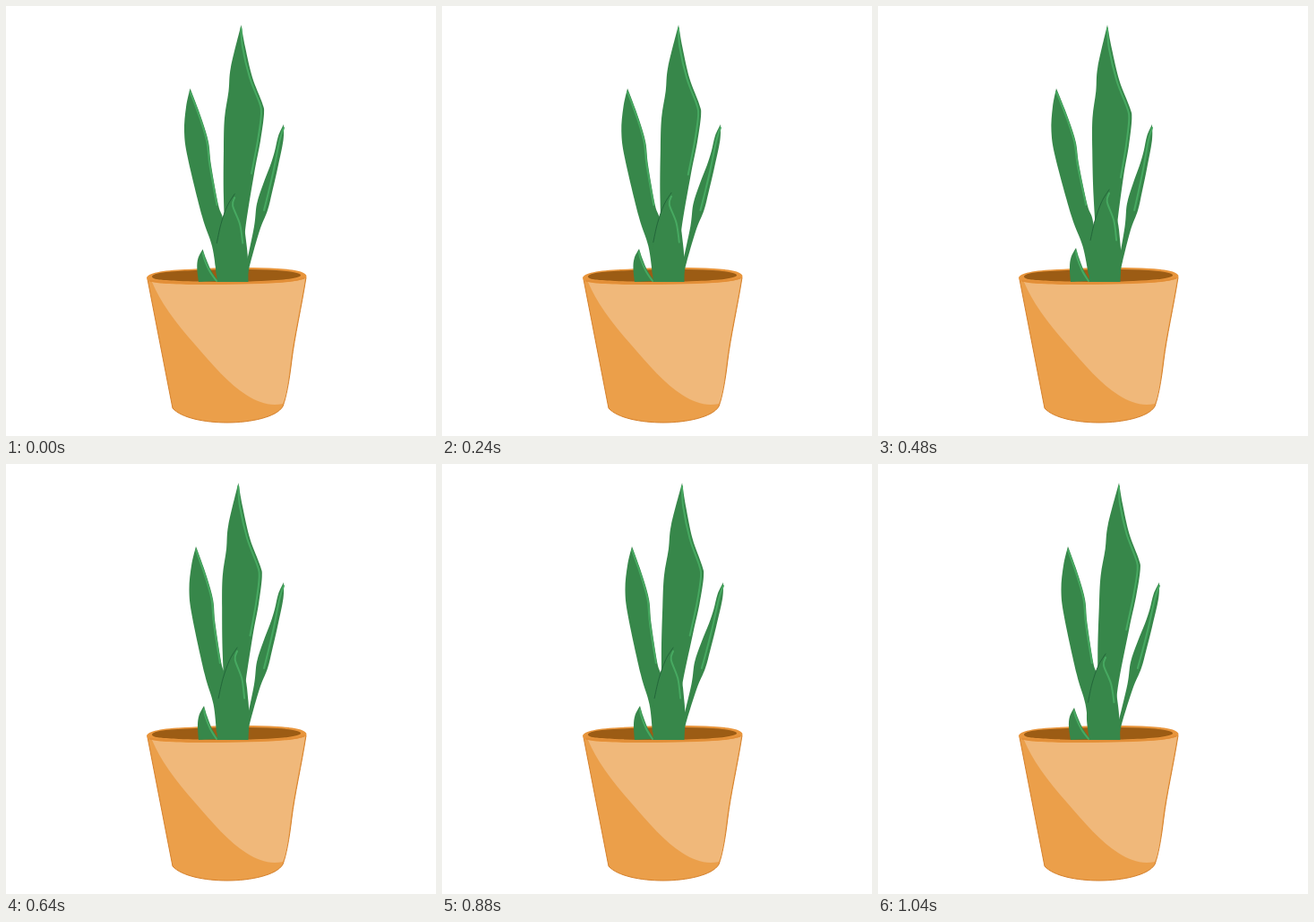
Write an HTML page that moves like this. It is 480 px wide and 480 px high and loops after 1.12 s.

```html
<!DOCTYPE html>
<html lang="en">
<head>
<meta charset="utf-8">
<title>Swaying plant</title>
<style>
  html, body { margin: 0; width: 100%; height: 100%; overflow: hidden; background: #fff; }
  svg { display: block; width: 100%; height: 100%; }
  .leaf { fill: #37874a; }
  .shine { fill: none; stroke: #47a961; stroke-width: 2; stroke-linecap: round; stroke-linejoin: round; }
  .seam { fill: none; stroke: #23663a; stroke-width: 1; stroke-linecap: round; }
</style>
</head>
<body>
<svg viewBox="0 0 480 480">
  <path fill="#eb9f4a" stroke="#d5812d" d="M158 305 L186 449 C196 460 222 465 247 465 C273 465 302 459 309 447 C313 436 316 420 319 395 C322 370 330 335 335 303 Z"/>
  <path fill="#f0b87a" d="M163 308 C172 330 188 352 211 378 C230 400 250 423 268 434 C282 443 295 447 309 444 C313 436 315 420 318 395 C321 370 329 335 334 304 Z"/>
  <path fill="#e8953c" d="M157 304 C157 298 175 295 200 294 C230 292 275 291 303 293 C323 294 336 297 335.500 302 C335 307 310 309 285 310 C255 311 225 311 203 311 C180 310 158 310 157 304 Z"/>
  <path fill="#9c5c14" d="M163 302 C164 298 182 296 203 295.500 C235 293.500 275 293.500 302 295 C318 296 329 298 329 300.500 C329 304 309 306 285 307 C255 308.500 215 308 193 307 C177 306 163 306 163 302 Z"/>
  <g id="plant"></g>
  <path fill="none" stroke="#e28e37" stroke-width="2" d="M160 306.500 C175 309 190 308 203 309.500 C230 309.500 265 309.500 285 308.500 C307 308 325 306 333 303.500"/>
</svg>
<script>
const LOOP = 1120, STEP = 80;
const FALL = 160, TURN = 480;

// Edges run from the tip down. A leaf leans by swing and is upright again at
// time back; move is the tip's shift when lifted; drop slides the right edge.
const leaves = [
  {
    tip: [262.5, 21], root: 255, power: 0.6, swing: 6.5, back: 960, drop: 8, inset: 3, lit: 7,
    left: [[251, 68], [248.5, 95], [244, 125], [243, 160], [243, 215], [246, 295]],
    right: [[267, 45], [275, 78], [286, 106], [288, 118], [284, 148], [277, 185], [267, 250], [264, 295]]
  },
  {
    tip: [205.5, 92], root: 285, power: 0.6, swing: 6.5, back: 640, inset: 1.5, lit: 6,
    left: [[201, 113], [199, 140], [203, 170], [219, 235], [230, 268], [235, 300]],
    right: [[211, 106], [219, 128], [226, 152], [229, 178], [237, 222], [243, 242], [246, 295]]
  },
  {
    tip: [310, 132], root: 290, power: 0.8, swing: 4, back: 800, inset: 4, lit: 5,
    left: [[304, 145], [300, 162], [295, 178], [287, 199], [280, 221], [277, 246], [268, 290]],
    right: [[309.5, 150], [303, 182], [297, 208], [292, 228], [283, 251], [273, 286], [270, 300]]
  },
  {
    tip: [254, 212], root: 307, power: 0.5, move: [4, -7], inset: 4, lit: 4, seam: true,
    left: [[246, 225], [239, 245], [234.5, 266], [233, 285], [236, 308]],
    right: [[256, 225], [264, 245], [267.5, 266], [269.5, 285], [270.5, 308]]
  },
  {
    tip: [219, 272], root: 307, power: 0.8, move: [2, -2], inset: 2, lit: 4,
    left: [[214, 282], [213, 293], [215, 308]],
    right: [[223, 283], [229, 296], [237, 307]]
  }
];

const plant = document.getElementById('plant');

function addPath(cls) {
  const el = document.createElementNS('http://www.w3.org/2000/svg', 'path');
  el.setAttribute('class', cls);
  plant.append(el);
  return el;
}

// Smooth curve segments through the points, without the initial move.
function curve(pts) {
  let d = '';
  for (let i = 0; i < pts.length - 1; i++) {
    const p = pts[i], q = pts[i + 1];
    const a = pts[i - 1] || p, b = pts[i + 2] || q;
    const c = [
      p[0] + (q[0] - a[0]) / 6, p[1] + (q[1] - a[1]) / 6,
      q[0] - (b[0] - p[0]) / 6, q[1] - (b[1] - p[1]) / 6, q[0], q[1]
    ];
    d += 'C' + c.map(n => n.toFixed(2)).join(' ');
  }
  return d;
}

const line = pts => 'M' + pts[0].join(' ') + curve(pts);

function smooth(u) {
  u = Math.min(1, Math.max(0, u));
  return u * u * (3 - 2 * u);
}

// Swing from 1 to -1 and back; the loop opens on the resting pose.
function leanAt(t, back) {
  if (t < FALL) return 0;
  if (t < TURN) return 1 - 2 * Math.sin((t - FALL) / (TURN - FALL) * Math.PI / 2);
  return 2 * smooth((t - TURN) / (back - TURN)) - 1;
}

function liftAt(t) {
  if (t < FALL) return 0.3;
  return smooth((t - 160) / 160) - smooth((t - 880) / 160);
}

// Early poses are held for two steps, with one extra drawing at step 3.
function heldTime(t) {
  const step = Math.floor(t / STEP);
  return STEP * (step < 8 && step !== 3 ? step - step % 2 : step);
}

function pose(leaf, t) {
  const { tip, root, power, swing = 0, back, move = [0, 0], drop = 0 } = leaf;
  const lift = liftAt(t);
  const dx = (swing && swing * leanAt(t, back)) + move[0] * lift;
  const dy = move[1] * lift;

  const warp = (pts, slide) => [tip, ...pts].map(([x, y]) => {
    const k = Math.min(1, Math.max(0, (root - y) / (root - tip[1])));
    const w = k ** power;
    return [x + dx * w, y + dy * w + slide * Math.sin(Math.PI * k)];
  });

  const left = warp(leaf.left, 0);
  const right = warp(leaf.right, drop * lift);
  const shine = right.slice(0, leaf.lit).map(([x, y], i) => [i ? x - leaf.inset : x, y + (i ? 0 : 4)]);
  const base = right[right.length - 1];
  leaf.body.setAttribute('d', line(left) + 'L' + base.join(' ') + curve([...right].reverse()) + 'Z');
  leaf.glow.setAttribute('d', line(shine));
  if (leaf.edge) leaf.edge.setAttribute('d', line(left.slice(0, 4)));
}

for (const leaf of leaves) {
  leaf.body = addPath('leaf');
  if (leaf.seam) leaf.edge = addPath('seam');
  leaf.glow = addPath('shine');
}

let shown = -1;

function tick() {
  const t = heldTime(performance.now() % LOOP);
  if (t !== shown) {
    shown = t;
    for (const leaf of leaves) pose(leaf, t);
  }
  requestAnimationFrame(tick);
}
tick();
</script>
</body>
</html>
```
